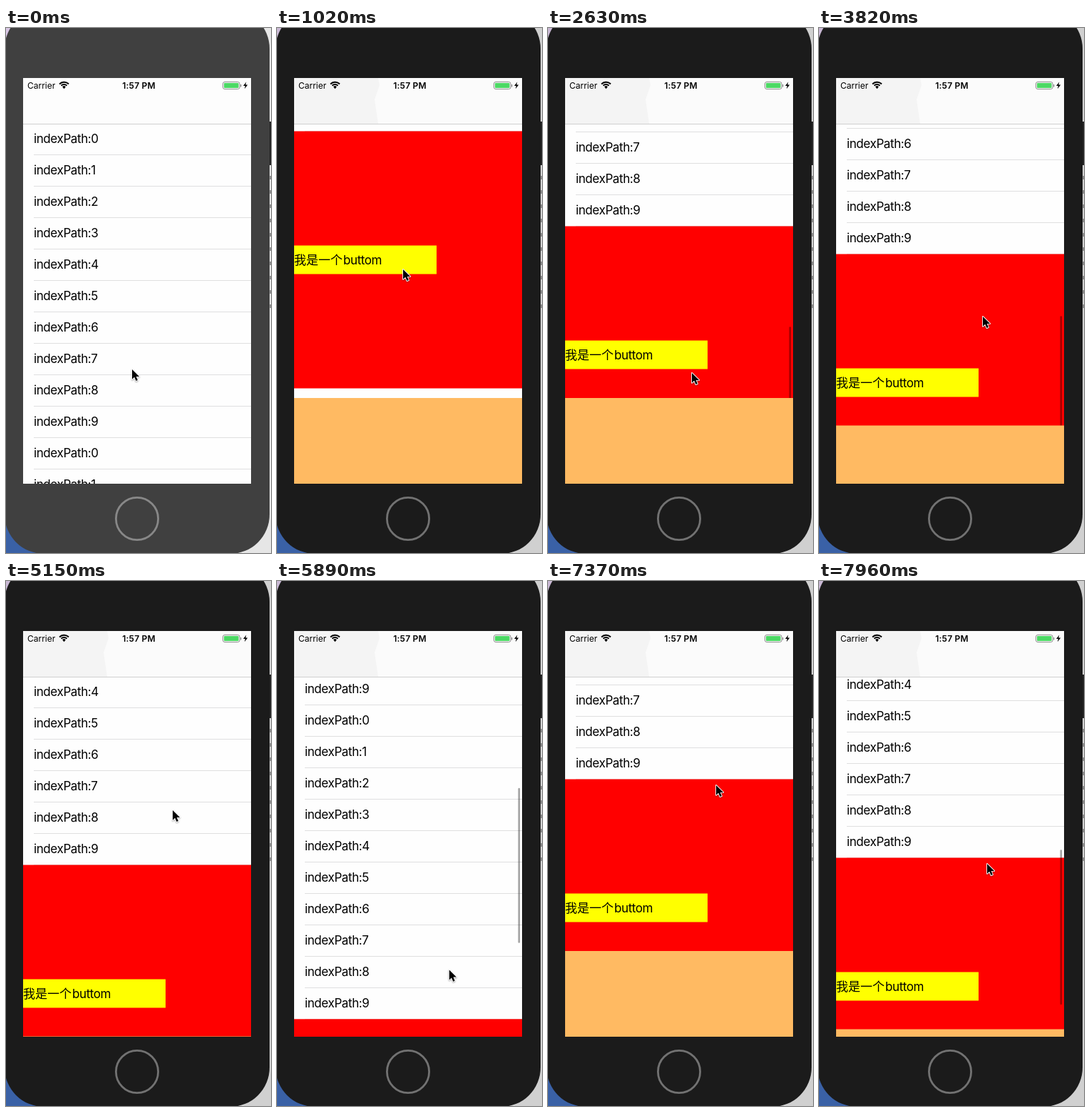
An HTML page with a canvas for the animation above (8 s loop, 372 by 735 pixels).

```html
<!DOCTYPE html>
<html lang="en">
<head>
<meta charset="utf-8">
<title>Table scroll demo</title>
<style>
  html, body { margin: 0; width: 100%; height: 100%; overflow: hidden; background: #ccc; }
  canvas { display: block; width: 372px; height: 735px; }
</style>
</head>
<body>
<canvas id="stage"></canvas>
<script>
const W = 372, H = 735, LOOP = 8000, STEP = 147.2;
const LEFT = 24, TOP = 134, WIDTH = 320, BOTTOM = 638;
const ROW = 44, ROWS = 20, MAX_OFFSET = 736;
const SANS = 'Inter, "Open Sans", sans-serif';
const CJK = '"Noto Sans CJK SC", "Noto Sans CJK", sans-serif';

// Start and length in screen refreshes, then the scroll offset and pointer reached.
const gesture = (start, length, offset, x, y) => ({ start, end: start + length, offset, x, y });
const REST = { offset: 0, x: 176, y: 477 };
const GESTURES = [
  gesture(5, 2, 869, 176, 337),
  gesture(7, 11, MAX_OFFSET, 201, 482),
  gesture(20, 5, MAX_OFFSET, 227, 335),
  gesture(25, 1, 697, 229, 403),
  gesture(26, 3, 616, 231, 480),
  gesture(32, 2, 616, 233, 320),
  gesture(35, 6, 394, 241, 550),
  gesture(42, 2, 820, 244, 455),
  gesture(44, 4, MAX_OFFSET, 244, 455),
  gesture(48, 2, MAX_OFFSET, 235, 285),
  gesture(50, 4, 626, 235, 395),
];

const canvas = document.getElementById('stage');
const scale = window.devicePixelRatio || 1;
canvas.width = W * scale;
canvas.height = H * scale;
const ctx = canvas.getContext('2d');

const clamp = v => Math.min(1, Math.max(0, v));
const easeOut = p => 1 - (1 - p) ** 2;

// The scroll bar shows while the table moves and fades over two refreshes.
function stateAt(step) {
  const state = { ...REST, bar: 0 };
  let previous = REST;
  for (const g of GESTURES) {
    if (step <= g.start) break;
    const p = easeOut(clamp((step - g.start) / (g.end - g.start)));
    for (const key of ['offset', 'x', 'y']) state[key] = previous[key] + (g[key] - previous[key]) * p;
    if (g.offset !== previous.offset) state.bar = clamp(1 - (step - g.end) / 2);
    previous = g;
  }
  return state;
}

function rect(x, y, w, h, color) {
  ctx.fillStyle = color;
  ctx.fillRect(x, y, w, h);
}

function roundRect(x, y, w, h, r, fill) {
  ctx.beginPath();
  ctx.roundRect(x, y, w, h, r);
  ctx.fillStyle = fill;
  ctx.fill();
}

function polygon(points) {
  ctx.beginPath();
  points.forEach(([x, y]) => ctx.lineTo(x, y));
  ctx.closePath();
}

function stroke(color, width) {
  ctx.strokeStyle = color;
  ctx.lineWidth = width;
  ctx.stroke();
}

function text(str, x, y, font, spacing = 0, align = 'left') {
  ctx.font = font;
  ctx.letterSpacing = spacing + 'px';
  ctx.textAlign = align;
  ctx.fillStyle = '#000';
  ctx.fillText(str, x, y);
}

function drawDesktop(active) {
  rect(0, 0, W, H, active ? '#d0d0d0' : '#e6e6e6');
  rect(0, 0, 20, 40, active ? '#c9b8d4' : '#d8c6e4');
  rect(0, 670, 60, 65, '#3a61a6');
  rect(370, 131, 2, 61, '#222');
  for (let y = 207; y < 392; y += 20) rect(370.5, y, 1.5, 5, '#777');
}

function drawPhone(active) {
  roundRect(-2, -26, 372, 762, 55, active ? '#1b1b1b' : '#404040');
  ctx.beginPath();
  ctx.arc(184, 687, 29.6, 0, 7);
  stroke(active ? '#727272' : '#888', 2.8);
}

function drawWifi(x, y) {
  const from = -Math.PI * 0.76, to = -Math.PI * 0.24;
  for (const r of [5.4, 8.8]) {
    ctx.beginPath();
    ctx.arc(x, y, r, from, to);
    stroke('#000', 2);
  }
  ctx.beginPath();
  ctx.moveTo(x, y + 0.7);
  ctx.arc(x, y, 3.2, from, to);
  ctx.fill();
}

function drawBattery() {
  ctx.beginPath();
  ctx.roundRect(304.5, 75.5, 23.5, 10, 2.5);
  stroke('#8c8c8c', 1);
  roundRect(306, 77, 20.5, 7, 1, '#4cd964');
  rect(329, 79, 1.3, 3.5, '#8c8c8c');
  polygon([[337.3, 75.5], [333, 81], [335.8, 81], [334.8, 85.3], [339.2, 79.5], [336.3, 79.5]]);
  ctx.fillStyle = '#000';
  ctx.fill();
}

function drawNavigation(active) {
  rect(LEFT, 70, WIDTH, 64, active ? '#fbfbfb' : '#fdfdfd');
  if (active) {
    polygon([[24, 70], [142, 70], [144, 80], [137, 100], [142, 134], [24, 134]]);
    ctx.fillStyle = '#f4f4f4';
    ctx.fill();
  }
  rect(LEFT, TOP, WIDTH, 1, '#cfcfcf');
  text('Carrier', 30, 84.5, '12px ' + SANS);
  text('1:57 PM', 186.5, 84.5, '600 12px ' + SANS, 0.2, 'center');
  drawWifi(81.5, 84.5);
  drawBattery();
}

function drawScrollBar(offset, alpha) {
  const over = Math.max(0, offset - MAX_OFFSET);
  const y = 137 + (offset - over) * 0.382 + over;
  roundRect(338.5, y, 2.6, 217 - over, 1.3, `rgba(0, 0, 0, ${0.36 * alpha})`);
}

function drawTable(offset, barAlpha) {
  ctx.save();
  ctx.beginPath();
  ctx.rect(LEFT, TOP + 1, WIDTH, BOTTOM - TOP - 1);
  ctx.clip();
  rect(LEFT, TOP, WIDTH, BOTTOM - TOP, '#fefefe');

  for (let i = 0; i < ROWS; i++) {
    const y = TOP + i * ROW - offset;
    text('indexPath:' + i % 10, 39, y + 27.3, '17px ' + SANS, -0.4);
    rect(39, Math.round(y + 43), 305, 1, '#dfdfe0');
  }

  const footer = TOP + ROWS * ROW - offset - 0.5;
  rect(LEFT, footer, WIDTH, 360, '#f00');
  rect(LEFT, footer + 160, 200, 40, '#ff0');
  text('我是一个', LEFT, footer + 186.3, '17px ' + CJK);
  text('buttom', 93, footer + 186.3, '17px ' + SANS, -0.4);
  drawScrollBar(offset, barAlpha);
  rect(LEFT, Math.max(518, footer + 240), WIDTH, 120, '#ffba62');
  ctx.restore();
}

function drawPointer(x, y) {
  ctx.save();
  ctx.translate(x + 0.5, y + 0.5);
  polygon([[0.5, 0.5], [0.5, 14.3], [3.7, 11.3], [6, 16.6], [8.4, 15.6], [6.2, 10.4], [10.6, 10.4]]);
  ctx.shadowColor = 'rgba(0, 0, 0, 0.35)';
  ctx.shadowBlur = 2 * scale;
  ctx.shadowOffsetY = scale;
  ctx.lineJoin = 'round';
  stroke('#fff', 1.8);
  ctx.shadowColor = 'transparent';
  ctx.fillStyle = '#000';
  ctx.fill();
  ctx.restore();
}

function draw(time) {
  const step = Math.floor((time % LOOP + 20) / STEP);
  const active = step > 0;
  const { offset, x, y, bar } = stateAt(step);
  ctx.setTransform(scale, 0, 0, scale, 0, 0);
  drawDesktop(active);
  drawPhone(active);
  drawNavigation(active);
  drawTable(offset, bar);
  drawPointer(x, y);
}

const start = performance.now();
function tick() {
  draw(performance.now() - start);
  requestAnimationFrame(tick);
}
tick();
</script>
</body>
</html>
```
